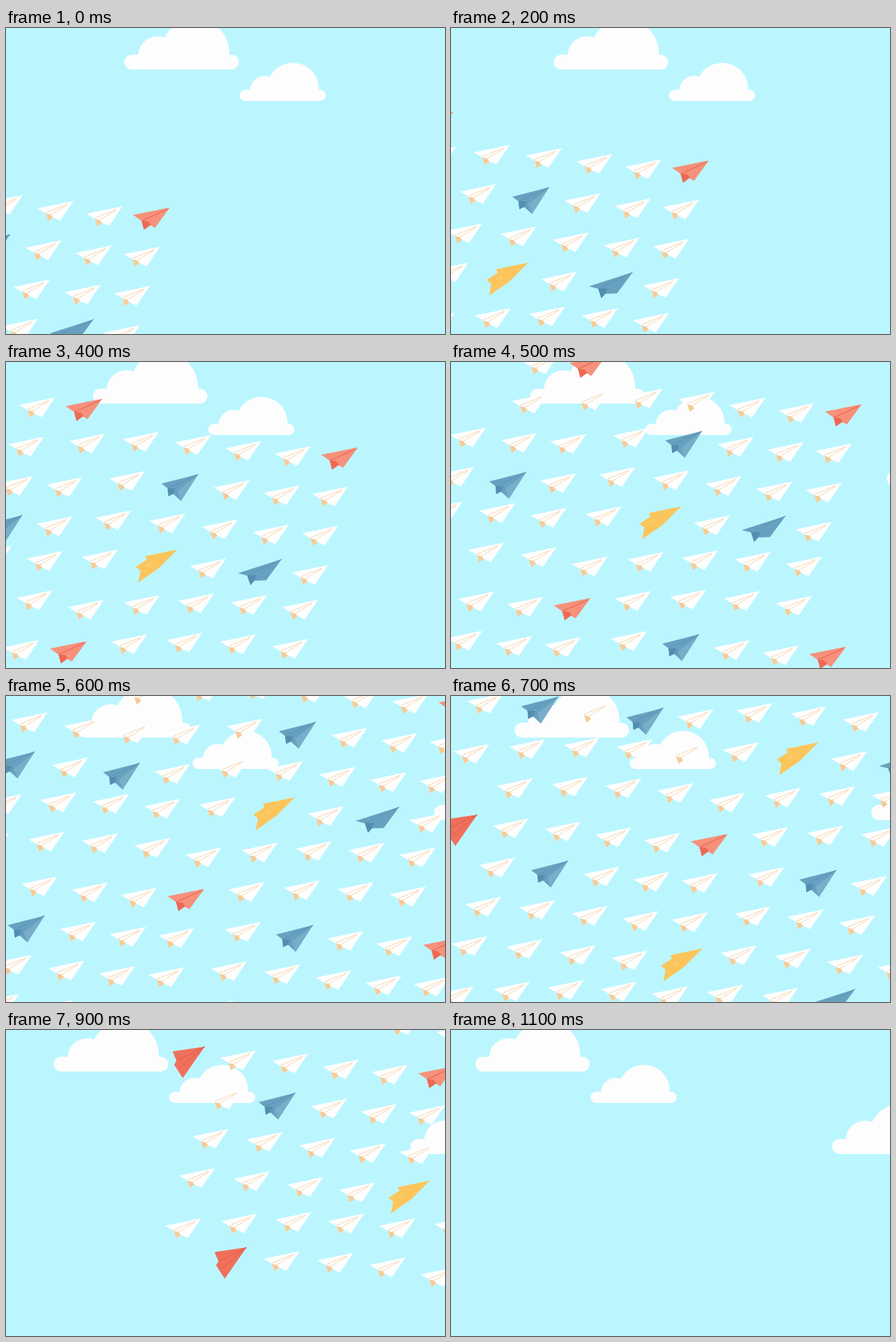
An HTML page for the animation above (4100 ms loop, 560 by 390 pixels).

```html
<!DOCTYPE html>
<html lang="en">
<head>
<meta charset="utf-8">
<title>Paper planes</title>
<style>
  html, body { margin: 0; width: 100%; height: 100%; overflow: hidden; background: #bbf6ff; }
  svg { display: block; width: 560px; height: 390px; }
</style>
</head>
<body>
<svg viewBox="0 0 560 390">
  <defs>
    <!-- Clouds start at their bottom left corner, planes at their nose. -->
    <clipPath id="above"><path d="M0 -80H146V0H0Z"/></clipPath>
    <g id="cloud" fill="#fdfdfd" clip-path="url(#above)">
      <rect y="-19" width="146" height="19" rx="9.5"/>
      <circle cx="42.5" cy="-17.5" r="25"/>
      <circle cx="90.3" cy="-21" r="43.8"/>
    </g>
    <g id="white">
      <path fill="#fefefe" d="M0 0L-46 9.5L-35 16L-32 25.5L-26 21L-17 25Z"/>
      <path fill="#f5cb98" d="M-35 16L-32 25.5L-26 21L-29 17.5Z"/>
      <path fill="none" stroke="#f3b878" stroke-width=".8" stroke-dasharray="2 1" d="M-35 15L-7 3.5M-29 17.5L-8 5"/>
    </g>
    <g id="orange">
      <path fill="#f6917b" d="M0 0L-47 9.5L-36 17L-33 28L-26 22L-19 26Z"/>
      <path fill="#ef6854" d="M-36 17L-33 28.5L-24 22L-28 17.5Z"/>
      <path fill="none" stroke="#e9604f" d="M-36 17L-3 2"/>
    </g>
    <g id="blue">
      <path fill="#68a1bf" d="M0 0L-47 12L-39 18L-38 28L-32 25L-22 34Z"/>
      <path fill="#538eb0" d="M-39 18L-38 28L-32 25L-29 18Z"/>
      <path fill="#78aeca" d="M0 0L-27 20L-22 34Z"/>
      <path fill="none" stroke="#538eb0" stroke-width=".6" d="M-39 18L0 0L-32 25"/>
    </g>
    <g id="dart" transform="translate(5 -6)">
      <path fill="#68a1bf" d="M0 0L-56 18L-44 21L-40 33L-35 27.5L-20 27Z"/>
      <path fill="#538eb0" d="M-44 21L-40 33L-35 27.5L-32 20Z"/>
      <path fill="none" stroke="#538eb0" stroke-width=".6" d="M-44 21L0 0"/>
    </g>
    <g id="yellow" transform="translate(6 -4)">
      <path fill="#fbc55c" d="M0 0L-41 8.5L-39 13L-53 22L-47 27L-50 42L-24 24Z"/>
      <path fill="none" stroke="#fde3a8" stroke-dasharray="1.5 2" d="M-40 21L-34 17L-35 23"/>
    </g>
    <g id="red" transform="translate(3 -7)">
      <path fill="#f0705c" d="M0 0L-41 6L-36 18L-39 23L-28 40Z"/>
      <path fill="none" stroke="#df5748" stroke-width=".8" d="M-36 18L0 0L-32 27"/>
    </g>
  </defs>
  <g id="sky">
    <use href="#cloud" transform="translate(151 53)"/>
    <use href="#cloud" transform="translate(298 93) scale(.753)"/>
    <use href="#cloud" transform="translate(606 158)"/>
  </g>
  <g id="flock"></g>
</svg>
<script>
const LOOP = 4100, STEP = 100, LAST = 11;
const sky = document.getElementById('sky');
const flock = document.getElementById('flock');

const kinds = { w: 'white', o: 'orange', b: 'blue', d: 'dart', y: 'yellow', r: 'red' };

// The same slanted squad repeats on a 2 x 2 lattice; a dot is an empty slot.
const squads = [
  ['wwwwwo wbwww wwwww wywdw wwwww .wwww', '.wbwwo wwwww wwww. wwd.. w....'],
  ['....wo ...w. .wwww wbwbw wwwww .wwww', 'rwwwwo wbwww wwwww wwwwy wwwww .rwww']
];

// Rows lean back and widen downwards; upper rows wave, the lower two sag.
function slot(row, col) {
  const x = -45 - 17.5 * row + col * (63.5 + 1.2 * row) + col * (4 - col);
  const bend = row < 4 ? 10 * Math.sin(0.8 * (col - 1.8)) : 2 * (col - 2) ** 2 - 4;
  return [x, 219 + 50 * row + bend];
}

function addPlane(letter, x, y) {
  const plane = document.createElementNS('http://www.w3.org/2000/svg', 'use');
  plane.setAttribute('href', '#' + kinds[letter]);
  plane.setAttribute('transform', `translate(${x} ${y})`);
  flock.append(plane);
}

squads.forEach((column, i) => column.forEach((squad, j) => {
  squad.split(' ').forEach((letters, row) => [...letters].forEach((letter, n) => {
    if (letter === '.') return;
    const [x, y] = slot(row, n + 5 - letters.length);
    addPlane(letter, x - 326 * i - 20 * j, y - 62 * i + 309 * j);
  }));
}));

// Flight path: step, x, y; straight lines between.
const path = [[0, 0, 0], [4, 240, -120], [6, 390, -230], [7, 490, -300], [9, 710, -430], [12, 1100, -625]];

function flight(step) {
  const k = path.findIndex(([end], i) => i > 0 && step <= end);
  const [s0, x0, y0] = path[k - 1], [s1, x1, y1] = path[k];
  const part = (step - s0) / (s1 - s0);
  return [x0 + (x1 - x0) * part, y0 + (y1 - y0) * part];
}

const drift = step => [-10 * step, 0];

// Motion jumps every STEP; the final jump is double and then holds.
function play(element, place) {
  const frames = [];
  const addFrame = (offset, step) => {
    const [x, y] = place(step);
    frames.push({ offset, transform: `translate(${x}px, ${y}px)`, easing: 'steps(1, end)' });
  };
  for (let i = 0; i < LAST; i++) addFrame(i * STEP / LOOP, i);
  addFrame(LAST * STEP / LOOP, LAST + 1);
  addFrame(1, LAST + 1);
  element.animate(frames, { duration: LOOP, iterations: Infinity });
}

play(flock, flight);
play(sky, drift);
</script>
</body>
</html>
```
